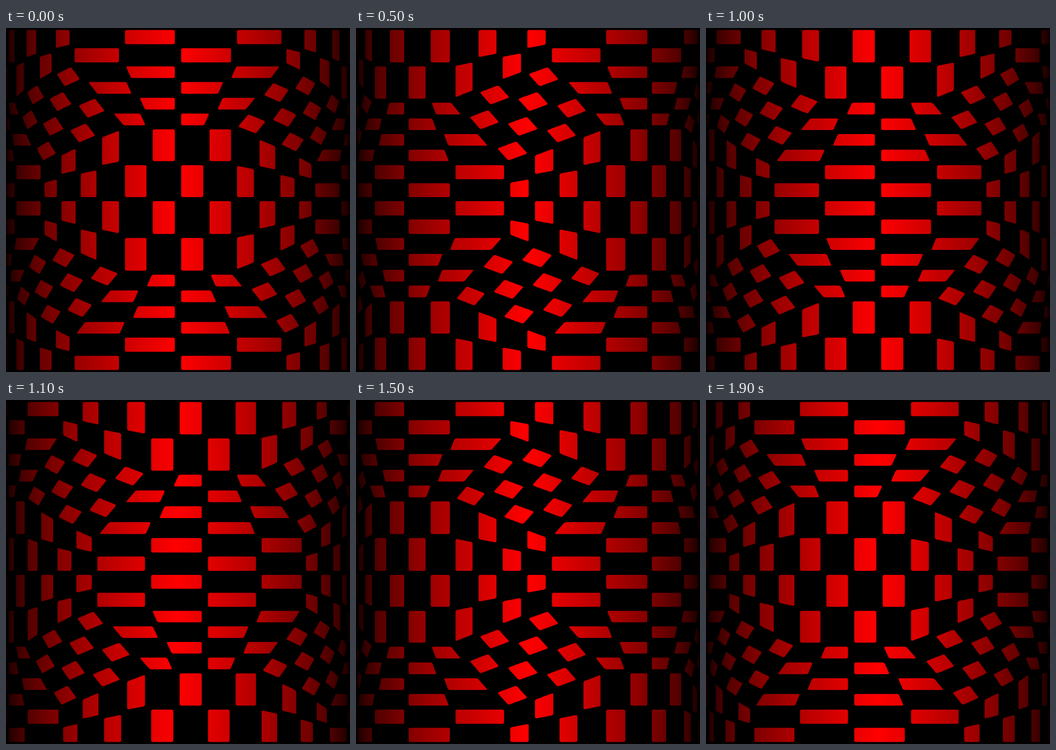
Animation of 600x600 px, one loop 2 s. Source, as an HTML page with a canvas:

```html
<!DOCTYPE html>
<html lang="en">
<head>
<meta charset="utf-8">
<title>Rolling checker</title>
<style>
  html, body { margin: 0; width: 100%; height: 100%; overflow: hidden; background: #000; }
  canvas { display: block; width: 600px; height: 600px; }
</style>
</head>
<body>
<canvas id="stage" width="600" height="600"></canvas>
<script>
const ctx = document.getElementById('stage').getContext('2d');

const R = 300;                 // cylinder radius, also half a tile
const STEP_MS = 100, STEPS = 20;
const INSET = 3.5, CORNER = 1.5;

// Half a tile holds two single, four tilted and two double cells.
const TILT = Math.cos(Math.PI / 6);
const SIDE = R / (6 + 4 * TILT);
const narrow = [0];
for (const w of [1, 1, TILT, TILT, TILT, TILT, 2, 2]) {
  narrow.push(narrow[narrow.length - 1] + w * SIDE);
}
const wide = narrow.map((_, n) => R - narrow[8 - n]);

const mod = (n, m) => ((n % m) + m) % m;
const mix = (a, b, t) => a + (b - a) * t;

// Position of a grid line in the mirrored, repeating tile
function line(table, n) {
  const m = mod(n, 16);
  return Math.floor(n / 16) * 2 * R + (m > 8 ? 2 * R - table[16 - m] : table[m]);
}

// 0 around one disc, 1 around the other, a ramp between
function blend(n) {
  const m = mod(n, 16);
  return Math.min(1, Math.max(0, (Math.min(m, 16 - m) - 2) / 4));
}

function vertex(i, j, sag) {
  const v = mix(line(wide, j), line(narrow, j), blend(i));
  return {
    x: mix(line(narrow, i), line(wide, i), blend(j)),
    y: v + sag * Math.max(0, 1 - Math.abs(v) / 128)
  };
}

// Moves every edge of a clockwise polygon inwards
function shrink(points, d) {
  const edges = points.map((p, k) => {
    const q = points[(k + 1) % points.length];
    const len = Math.hypot(q.x - p.x, q.y - p.y);
    const dx = (q.x - p.x) / len, dy = (q.y - p.y) / len;
    return { x: p.x - dy * d, y: p.y + dx * d, dx, dy };
  });
  return edges.map((e, k) => {
    const f = edges[(k + edges.length - 1) % edges.length];
    const s = ((e.x - f.x) * e.dy - (e.y - f.y) * e.dx) / (f.dx * e.dy - f.dy * e.dx);
    return { x: f.x + f.dx * s, y: f.y + f.dy * s };
  });
}

function project(x, y) {
  const u = Math.max(-1, Math.min(1, x / R));
  return [R + R * Math.sin(u * Math.PI / 2), R + y];
}

function addCell(i, j, shift, sag) {
  const corners = [[i, j], [i + 1, j], [i + 1, j + 1], [i, j + 1]]
    .map(([a, b]) => vertex(a, b, sag));
  if (corners.every(p => p.x + shift <= -R) || corners.every(p => p.x + shift >= R)) return;
  const shape = shrink(corners, INSET);
  let first = true;
  shape.forEach((p, k) => {
    const q = shape[(k + 1) % 4];
    const cut = CORNER / Math.hypot(q.x - p.x, q.y - p.y);
    for (let n = 0; n <= 8; n++) {
      const t = mix(cut, 1 - cut, n / 8);
      const [x, y] = project(mix(p.x, q.x, t) + shift, mix(p.y, q.y, t));
      if (first) ctx.moveTo(x, y); else ctx.lineTo(x, y);
      first = false;
    }
  });
  ctx.closePath();
}

// Light falls off evenly with the angle around the cylinder
const shade = ctx.createLinearGradient(0, 0, 2 * R, 0);
for (let n = -45; n <= 45; n++) {
  const stop = (1 + Math.sin(n / 90 * Math.PI)) / 2;
  shade.addColorStop(stop, `rgb(${Math.round(255 * (1 - Math.abs(n) / 45))},0,0)`);
}

function draw(now) {
  const step = Math.floor(now / STEP_MS) % STEPS;
  const shift = step * 2 * R / STEPS;
  const sag = step <= STEPS / 2 ? -1.5 : 1.5;
  ctx.fillStyle = '#000';
  ctx.fillRect(0, 0, 2 * R, 2 * R);
  ctx.beginPath();
  for (let i = -26; i < 10; i++) {
    for (let j = -8; j < 8; j++) {
      if (mod(i + j, 2)) addCell(i, j, shift, sag);
    }
  }
  ctx.fillStyle = shade;
  ctx.fill();
}

let start;
function tick(now) {
  if (start === undefined) start = now;
  draw(now - start);
  requestAnimationFrame(tick);
}
draw(0);
requestAnimationFrame(tick);
</script>
</body>
</html>
```
